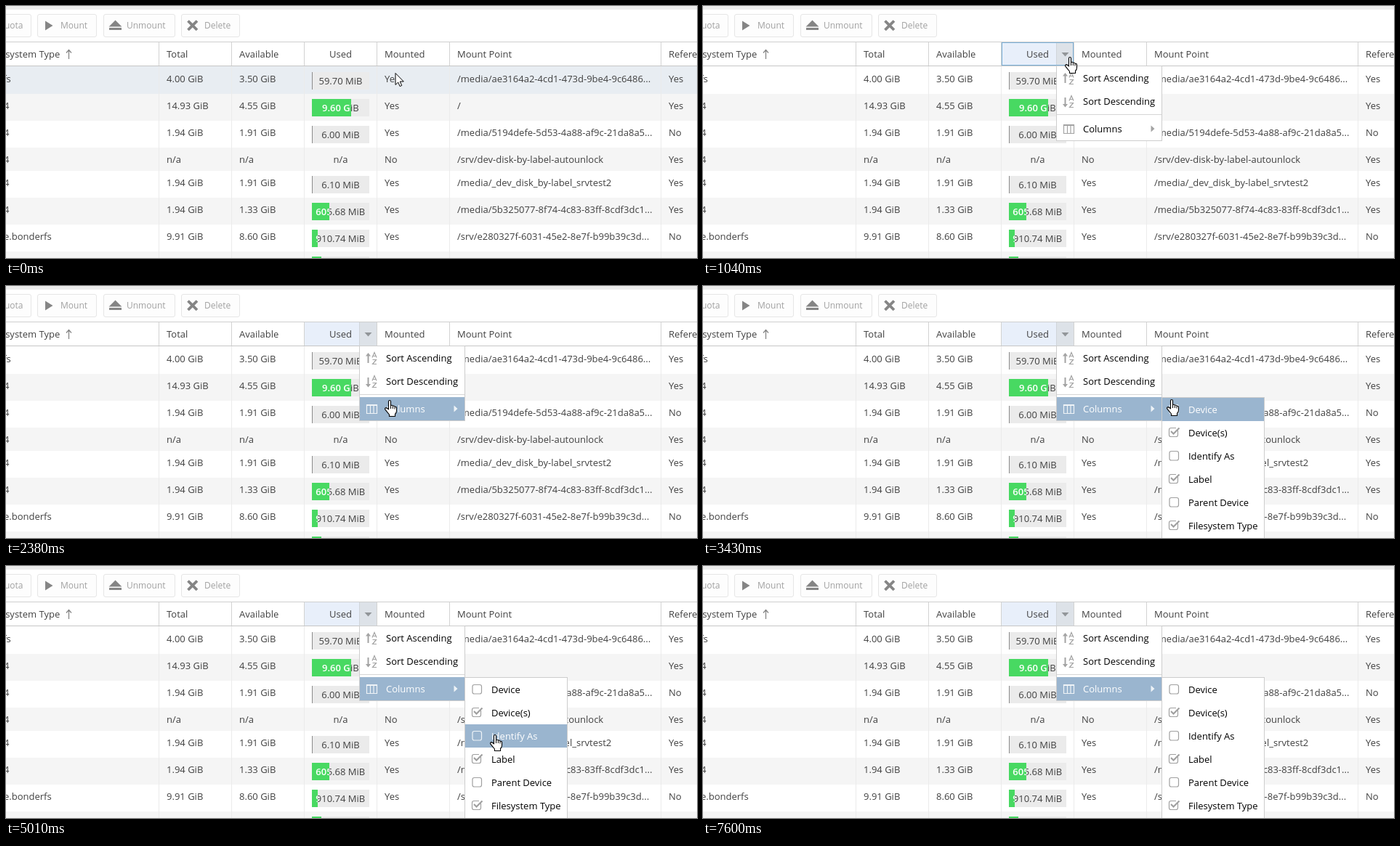
Write an HTML page that moves like this. It is 951x347 px and loops after 8 s.

```html
<!DOCTYPE html>
<html lang="en">
<head>
<meta charset="utf-8">
<title>File systems table</title>
<style>
  html, body { margin: 0; width: 100%; height: 100%; overflow: hidden; background: #fff; }
  svg { display: block; width: 951px; height: 347px; }
  text { font: 13px "Open Sans", "Noto Sans", sans-serif; white-space: pre; }
  .mid { text-anchor: middle; }
  .end { text-anchor: end; }
  .tool { font-size: 12px; }
  .bold { font-weight: 600; }
</style>
</head>
<body>
<svg id="stage" viewBox="0 0 951 347" xmlns="http://www.w3.org/2000/svg"></svg>
<script>
const LOOP = 8000;
const INK = '#404040', BLUE = '#9ab5cf', GREEN = '#48d962';
const css = [];
let count = 0;

const pct = ms => (ms / LOOP * 100).toFixed(4) + '%';
const rect = (x, y, w, h, fill, more = '') =>
  `<rect x="${x}" y="${y}" width="${w}" height="${h}" fill="${fill}" ${more}/>`;
const text = (x, y, s, fill = INK, cls = '') =>
  `<text x="${x}" y="${y}" fill="${fill}" class="${cls}">${s}</text>`;
const path = (d, fill, more = '') => `<path d="${d}" fill="${fill}" ${more}/>`;
const line = (d, stroke, width = 1) => path(d, 'none', `stroke="${stroke}" stroke-width="${width}"`);
const at = (x, y, body) => `<g transform="translate(${x} ${y})">${body}</g>`;

// Attaches a stepped animation to a group
function animate(body, frames) {
  const id = 'k' + count++;
  css.push(`@keyframes ${id}{${frames}} #${id}{animation:${id} ${LOOP}ms step-end infinite}`);
  return `<g id="${id}">${body}</g>`;
}

// Shows a group only from one time to another
const during = (from, to, body) => animate(body,
  `0%{opacity:${from ? 0 : 1}} ${from ? pct(from) + '{opacity:1}' : ''} ${pct(to)}{opacity:0}`);

function toolbar() {
  const button = (x, w, label, tx) =>
    rect(x + .5, 11.5, w, 31, '#fdfdfd', 'rx="2.5" stroke="#e6e6e6"') +
    text(tx, 31, label, '#a0a0a0', 'tool');
  const gray = '#858585';
  return rect(0, 0, 951, 5, '#ebebeb') +
    button(-40, 74, 'uota', -2) +
    button(43, 81, 'Mount', 75) + path('M54 20.5L64.5 27L54 33.5Z', gray) +
    button(134, 98, 'Unmount', 166) + path('M150.5 19.5L159.5 28.5H141.5Z M142 30h17v3h-17z', gray) +
    button(241, 80, 'Delete', 273) + line('M250.5 20.5L263 33M263 20.5L250.5 33', gray, 3.8);
}

const edges = [210, 310, 410, 510, 610, 901];

const headLabel = () => text(460.5, 71, 'Used', INK, 'mid');
const caret = () => path('M493.5 64H503.5L498.5 69.5Z', '#929699');

function header() {
  const sides = edges.map(x => `M${x + .5} 50V82`).join('');
  return line('M0 49.5H951', '#cfcfcf') + line('M0 82.5H951', '#c6c6c6') + line(sides, '#d2d2d2') +
    text(74.2, 71, 'system Type', INK, 'end') +
    line('M86.5 73V61M83 64.5L86.5 60.5L90 64.5', '#808080', 1.2) +
    text(221, 71, 'Total') + text(321, 71, 'Available') + headLabel() +
    text(521, 71, 'Mounted') + text(621, 71, 'Mount Point') + text(912, 71, 'Referenced');
}

// Row: top, type, type end, total, available, used, bar width, mounted, mount point, referenced
const rows = [
  [84, 'fs', 6.8, '4.00 GiB', '3.50 GiB', '59.70 MiB', 1, 'Yes', '/media/ae3164a2-4cd1-473d-9be4-9c6486...', 'Yes'],
  [121, '4', 4.5, '14.93 GiB', '4.55 GiB', '9.60 GiB', 54, 'Yes', '/', 'Yes'],
  [158, '4', 4.5, '1.94 GiB', '1.91 GiB', '6.00 MiB', 1, 'Yes', '/media/5194defe-5d53-4a88-af9c-21da8a5...', 'No'],
  [195, '4', 4.5, 'n/a', 'n/a', 'n/a', 0, 'No', '/srv/dev-disk-by-label-autounlock', 'Yes'],
  [227, '4', 4.5, '1.94 GiB', '1.91 GiB', '6.10 MiB', 1, 'Yes', '/media/_dev_disk_by-label_srvtest2', 'Yes'],
  [264, '4', 4.5, '1.94 GiB', '1.33 GiB', '605.68 MiB', 24, 'Yes', '/media/5b325077-8f74-4c83-83ff-8cdf3dc1...', 'Yes'],
  [301, 'e.bonderfs', 62.7, '9.91 GiB', '8.60 GiB', '910.74 MiB', 8, 'Yes', '/srv/e280327f-6031-45e2-8e7f-b99b39c3d...', 'No'],
  [338, '', 0, '', '', '', 13, '', '', '']
];

function bar(y, label, w) {
  if (!w) return text(460.5, y + 21, label, INK, 'mid');
  const id = 'bar' + y;
  return rect(421, y + 7, 79, 24, '#ebebeb') +
    text(460.5, y + 24, label, INK, 'mid') +
    rect(421, y + 7, w, 24, w > 1 ? GREEN : '#8c8c8c') +
    (w > 1 ? `<clipPath id="${id}">${rect(421, y + 7, w, 24, '#000')}</clipPath>` +
      `<g clip-path="url(#${id})">${text(460.5, y + 24, label, '#fff', 'mid bold')}</g>` : '');
}

function table() {
  const back = rows.map((r, i) => rect(0, r[0], 951, 37, i % 2 ? '#f5f5f5' : '#fff')).join('');
  const hover = during(0, 270, rect(0, 83, 951, 38, '#e8edf2'));
  const grid = line(edges.map(x => `M${x + .5} 83V347`).join(''), '#ebebeb');
  const cells = rows.map(([y, type, end, total, free, used, w, on, point, ref]) =>
    text(end, y + 21, type, INK, 'end') + text(221, y + 21, total) + text(321, y + 21, free) +
    bar(y, used, w) + text(521, y + 21, on) + text(621, y + 21, point) + text(912, y + 21, ref)).join('');
  return back + hover + grid + cells;
}

function headStates() {
  const cell = (fill, trigger) => rect(411, 50, 99, 32, fill) + rect(487, 50, 23, 32, trigger) +
    line('M486.5 50V82', '#d0d5da') + headLabel() + caret();
  return during(270, 1040, cell('#e8edf2', '#edf1f5')) +
    during(1040, LOOP, cell('#e8effa', '#dde2e8')) +
    during(1040, 2120, rect(411.5, 50.5, 98, 31, 'none', 'stroke="#79afd8"'));
}

function sortIcon(y, down, color) {
  const head = down ? 'M495 12L498.5 16.5L502 12Z' : 'M495 5.5L498.5 1L502 5.5Z';
  return at(0, y, line('M498.5 3V15', color, 2) + path(head, color) +
    line('M504 7.5L507 .5L510 7.5M505 5.5H509M504.5 10.5H509.5L504.5 16.5H510', color, 1.2));
}

const columnsIcon = color =>
  line('M496.5 163.5H510.5V175.5H496.5ZM501.5 163V175M506 163V175M496 164.5H511', color, 1.2);

const sortDown = (ink, icon) => sortIcon(123, true, icon) + text(523, 136, 'Sort Descending', ink);
const columns = (ink, icon) => columnsIcon(icon) + text(523, 174, 'Columns', ink) +
  path('M616.5 164.5L621.5 169L616.5 173.5Z', icon);

function menu() {
  const gray = '#a3a3a3';
  return during(1040, LOOP,
    rect(486.5, 82.5, 145, 103, '#fff', 'stroke="#cdcdcd"') +
    sortIcon(91, false, gray) + text(523, 104, 'Sort Ascending', '#000') +
    sortDown('#000', gray) + line('M487 149.5H631', '#d6d6d6') + columns('#000', gray)) +
    during(2120, 2380, rect(487, 115, 144, 32, BLUE) + sortDown('#fff', '#eef3f7')) +
    during(2380, LOOP, rect(487, 153, 144, 32, BLUE) + columns('#fff', '#eef3f7'));
}

// Item: label, checked, highlight start and end
const items = [
  ['Device', 0, 3430, 4230],
  ['Device(s)', 1, 4230, 5010],
  ['Identify As', 0, 5010, 5540],
  ['Label', 1, 5540, 7080],
  ['Parent Device', 0],
  ['Filesystem Type', 1, 7080, 7600]
];

function option(label, checked, ink, mark) {
  const box = checked
    ? line('M653.5 13V19Q653.5 21.5 651 21.5H644Q641.5 21.5 641.5 19V12Q641.5 9.5 644 9.5H651', mark, 1.2) +
      line('M644 14L647.5 17.5L655.5 9.5', mark, 2.2)
    : rect(642, 9.5, 12.5, 12.5, 'none', `rx="2.5" stroke="${mark}" stroke-width="1.2"`);
  return box + text(668, 21, label, ink);
}

function submenu() {
  const list = items.map(([label, on], i) => at(0, 154 + 32 * i, option(label, on, '#000', '#a0a0a0'))).join('');
  const lit = items.map(([label, on, from, to], i) => from ? during(from, to,
    at(0, 154 + 32 * i, rect(632, 0, 140, 32, BLUE) + option(label, on, '#fff', '#eef3f7'))) : '').join('');
  return during(2640, LOOP, rect(631.5, 153.5, 141, 210, '#fff', 'stroke="#cdcdcd"') + list) + lit;
}

// Pointer stops: time, left, top
const stops = [
  [540, 500, 69], [790, 498, 70], [1600, 503, 96], [1870, 519, 144], [2120, 519, 155],
  [2380, 521, 157], [3170, 622, 156], [3430, 638, 156], [3710, 646, 156], [3960, 664, 189],
  [4230, 663, 206], [4480, 665, 211], [5010, 666, 232], [5270, 669, 251], [5540, 669, 258],
  [6550, 670, 265], [6800, 672, 301]
];

function pointers() {
  const arrow = at(535.5, 92, path('M.5 .5V16.5L4.2 13L6.6 18.6L9.2 17.5L6.8 12H11.8Z', '#fff', 'stroke="#000"'));
  const split = 'M507.5 68.5V84.5M510.5 68.5V84.5M500 76.5H506M512 76.5H518';
  const tips = 'M499 76.5L503 73V80ZM519 76.5L515 73V80Z';
  const resize = line(split, '#fff', 3.4) + path(tips, '#000', 'stroke="#fff" stroke-width="1.4" paint-order="stroke"') +
    line(split, '#000', 1.5);
  const hand = path('M5.5 2Q5.5 .5 7 .5T8.5 2V7.5Q11 6.8 11.3 8.2Q13.5 7.6 14 9.2Q16.5 9 16.5 11V15' +
    'Q16.5 17.5 14.5 19.5V22.5H6.5V20Q4 17 .7 12.8Q.2 11 2 10.6Q3.8 10.8 5.5 13Z', '#fff',
    'stroke="#000" stroke-width="1.1" stroke-linejoin="round"') + line('M8.5 7.5V12M11.3 8.5V12M14 9.5V12.5', '#000');
  const move = ([ms, x, y]) => `${pct(ms)}{transform:translate(${x}px,${y}px)}`;
  const start = '0%{transform:translate(500px,69px)}';
  return during(0, 270, arrow) + during(270, 540, resize) +
    during(540, 7080, animate(hand, start + stops.map(move).join('')));
}

document.getElementById('stage').innerHTML =
  toolbar() + table() + header() + headStates() + menu() + submenu() + pointers();
const style = document.createElement('style');
style.textContent = css.join('\n');
document.head.append(style);
</script>
</body>
</html>
```
